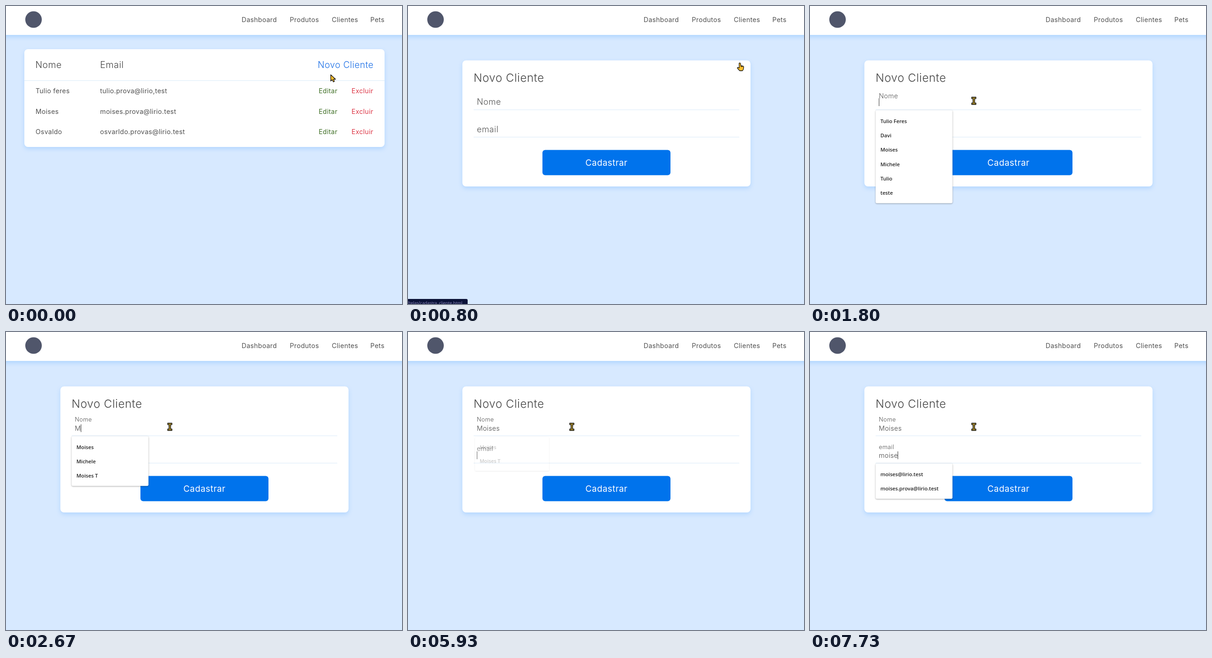
An HTML page for the animation above (8 s loop, 863 by 649 pixels).

```html
<!DOCTYPE html>
<html lang="pt">
<head>
<meta charset="utf-8">
<title>Novo Cliente</title>
<style>
  html, body { margin: 0; width: 100%; height: 100%; overflow: hidden; background: #d7e9ff; }
  svg { display: block; width: 100%; height: 100%; }
  text { font: 14.3px Inter, sans-serif; letter-spacing: .025em; fill: #505050; white-space: pre; }
  .bar { fill: #fff; filter: drop-shadow(0 5px 4px rgba(0, 123, 255, .17)); }
  .card { fill: #fff; filter: drop-shadow(0 4px 5px rgba(0, 123, 255, .17)); }
  .head text { font-size: 19.8px; font-weight: 350; fill: #444; }
  .head .new { font-size: 19.4px; fill: #1b6fe6; }
  .end { text-anchor: end; }
  .edit { fill: #3f6f26; }
  .del { fill: #dc3545; }
  .rule { stroke: #d9eaf8; }
  .title { font-size: 24.5px; font-weight: 350; fill: #444; }
  .label { font-weight: 300; fill: #555; }
  .typed { font-weight: 300; fill: #444; }
  .button { font-size: 18.9px; fill: #fff; text-anchor: middle; }
  .menu text { font: 600 11.2px "Open Sans", sans-serif; letter-spacing: 0; fill: #222; }
  .menu rect { fill: #fff; filter: drop-shadow(0 1px 1.5px rgba(0, 0, 0, .35)); }
  #status text { font: 9.3px "Open Sans", sans-serif; letter-spacing: 0; fill: #8d89bd; }
  .cursor { stroke: #111; stroke-width: 1.3; stroke-linejoin: round; fill: #fdbf2d; }
</style>
</head>
<body>
<svg viewBox="0 0 863 649">
  <rect width="863" height="649" fill="#d7e9ff"/>
  <rect class="bar" x="-20" y="-20" width="903" height="83"/>
  <circle cx="60" cy="29.5" r="18" fill="#50566b"/>
  <text x="513.5" y="34.500">Dashboard</text>
  <text x="618.5" y="34.500">Produtos</text>
  <text x="710" y="34.500">Clientes</text>
  <text x="794" y="34.500">Pets</text>

  <g id="list">
    <rect class="card" x="40" y="94" width="785" height="213" rx="8"/>
    <g class="head">
      <text x="64" y="134.5">Nome</text>
      <text x="205" y="134.5">Email</text>
      <text class="new end" x="801" y="134.5">Novo Cliente</text>
    </g>
    <path class="rule" d="M40 162.5H825"/>
    <g id="rows"></g>
  </g>

  <g id="form">
    <rect class="card" x="118.500" y="118.500" width="628" height="274.500" rx="8"/>
    <text class="title" x="143" y="164.500">Novo Cliente</text>
    <path class="rule" d="M143 226H722M143 285.500H722"/>
    <text class="label" x="150">Nome</text>
    <text class="label" x="150">email</text>
    <text class="typed" x="150" y="214.500"></text>
    <text class="typed" x="150" y="274"></text>
    <path id="caret" stroke="#333"/>
    <rect x="293" y="313.500" width="279" height="55" rx="6" fill="#0073ec"/>
    <text class="button" x="432.500" y="348">Cadastrar</text>
    <g class="menu" id="menu"></g>
  </g>

  <g id="status">
    <path d="M0 638H127q3 0 3 3V649H0z" fill="#0b1238"/>
    <text x="-1" y="650">/telas/cadastra_cliente.html</text>
  </g>

  <g class="cursor">
    <path id="arrow" d="M.7 .7V14.500L4 11.500L6.200 16.300L8.800 15.200L6.700 10.500H11.200z"/>
    <path id="hand" d="M-1.500 1.800q1.800-2 3 .2l1 4.800 4 .9q2.500.6 2 3.300l-.6 4-2 3h-6l-4.300-4.500q-1.800-2.300.3-2.800l3 1.200z
      M2.500 6.800l.6 3M5 7.400l.4 2.600"/>
    <path id="beam" fill="#a08428" d="M-4.700-8H4.700V-4.700H1.900V4.700H4.700V8H-4.700V4.700H-1.900V-4.700H-4.700z"/>
  </g>
</svg>
<script>
const LOOP = 8000, BLINK = 530, ROW = 31.35;
const $ = id => document.getElementById(id);
const clamp = v => Math.min(1, Math.max(0, v));
const progress = (t, start, length) => clamp((t - start) / length);
const mix = (a, b, p) => a + (b - a) * p;
const easeOut = p => 1 - (1 - p) ** 2.3;
const easeInOut = p => p * p * (3 - 2 * p);
const show = (el, opacity) => el.setAttribute('opacity', +opacity);

const clients = [
  ['Tulio feres', 'tulio.prova@lirio,test'],
  ['Moises', 'moises.prova@lirio.test'],
  ['Osvaldo', 'osvarldo.provas@lirio.test'],
];
$('rows').innerHTML = clients.map(([name, email], i) => {
  const y = 190 + i * 44.5;
  return `<text x="64.500" y="${y}">${name}</text><text x="205" y="${y}">${email}</text>
    <text class="edit end" x="722.500" y="${y}">Editar</text><text class="del end" x="800.500" y="${y}">Excluir</text>`;
}).join('');

const suggestions = [
  ['Tulio Feres', 'Davi', 'Moises', 'Michele', 'Tulio', 'teste', 'Moises T'],
  ['moises@lirio.test', 'moises.prova@lirio.test', 'michele@lirio.test', 'mteste@lirio.test'],
];
// time, focused field, its text
const typing = [
  [1740, 0, ''], [2670, 0, 'M'], [3270, 0, 'Mo'], [3670, 0, 'Moi'], [3870, 0, 'Mois'],
  [5400, 0, 'Moise'], [5600, 0, 'Moises'], [5800, 1, ''], [7270, 1, 'm'], [7330, 1, 'mo'],
  [7470, 1, 'moi'], [7670, 1, 'mois'], [7730, 1, 'moise'],
];
const fields = [
  { base: 215, top: 195, focusAt: 1680 },
  { base: 274.5, top: 255, focusAt: 5775 },
];
const labels = document.querySelectorAll('.label');
const inputs = document.querySelectorAll('.typed');

function drawMenu(field, prefix, leaving) {
  const items = suggestions[field].filter(s => s.startsWith(prefix)).slice(0, 6);
  const top = 227 + field * 59.3, height = 14.3 + ROW * items.length;
  $('menu').innerHTML = `<rect x="143" y="${top}" width="167.500" height="${height}" rx="3"/>` +
    items.map((s, i) => `<text x="153.500" y="${top + 27.5 + i * ROW}">${s}</text>`).join('');
  const cx = 226.5, cy = top + height / 2;
  $('menu').setAttribute('transform',
    `translate(${cx} ${cy}) scale(${1 - .047 * leaving}) translate(${-cx} ${-cy})`);
}

function drawForm(t) {
  fields.forEach((f, i) => {
    const p = easeOut(progress(t, f.focusAt, 300));
    labels[i].setAttribute('y', mix(f.base, f.top, p));
    labels[i].style.fontSize = mix(18.2, 12.8, p) + 'px';
    const last = typing.filter(([at, field]) => field === i && at <= t).pop();
    inputs[i].textContent = last ? last[2] : '';
  });

  const [since, field, text] = typing.filter(([at]) => at <= t).pop() || [Infinity, 0, ''];
  show($('caret'), since <= t && (t - since) % (2 * BLINK) < BLINK);
  const x = Math.floor(150 + (text ? inputs[field].getComputedTextLength() : 0)) + .5;
  $('caret').setAttribute('d', `M${x} ${201 + field * 59}v17`);

  const leaving = progress(t, 5800, 170);
  if (field && text) {
    drawMenu(1, text, 0);
    show($('menu'), 1);
  } else {
    drawMenu(0, field ? 'Moises' : text, leaving);
    show($('menu'), progress(t, 1690, 100) * (1 - leaving));
  }
}

function drawCursor(t) {
  const up = easeInOut(progress(t, 30, 300)), across = easeInOut(progress(t, 1030, 600));
  const x = mix(mix(707, 723, up), 357, across);
  const y = mix(mix(149, 123, up), 206.5, across);
  const shape = across === 0 ? (y < 138 ? 'hand' : 'arrow') : (y > 188 ? 'beam' : 'arrow');
  for (const id of ['arrow', 'hand', 'beam']) {
    show($(id), id === shape);
    $(id).setAttribute('transform', `translate(${x} ${y})`);
  }
}

function render(t) {
  const formOpen = t >= 735;
  show($('list'), !formOpen);
  show($('form'), formOpen);
  show($('status'), progress(t, 500, 250) * (1 - progress(t, 1050, 200)));
  drawForm(t);
  drawCursor(t);
}

const start = performance.now();
function tick() {
  render((performance.now() - start) % LOOP);
  requestAnimationFrame(tick);
}
tick();
</script>
</body>
</html>
```
